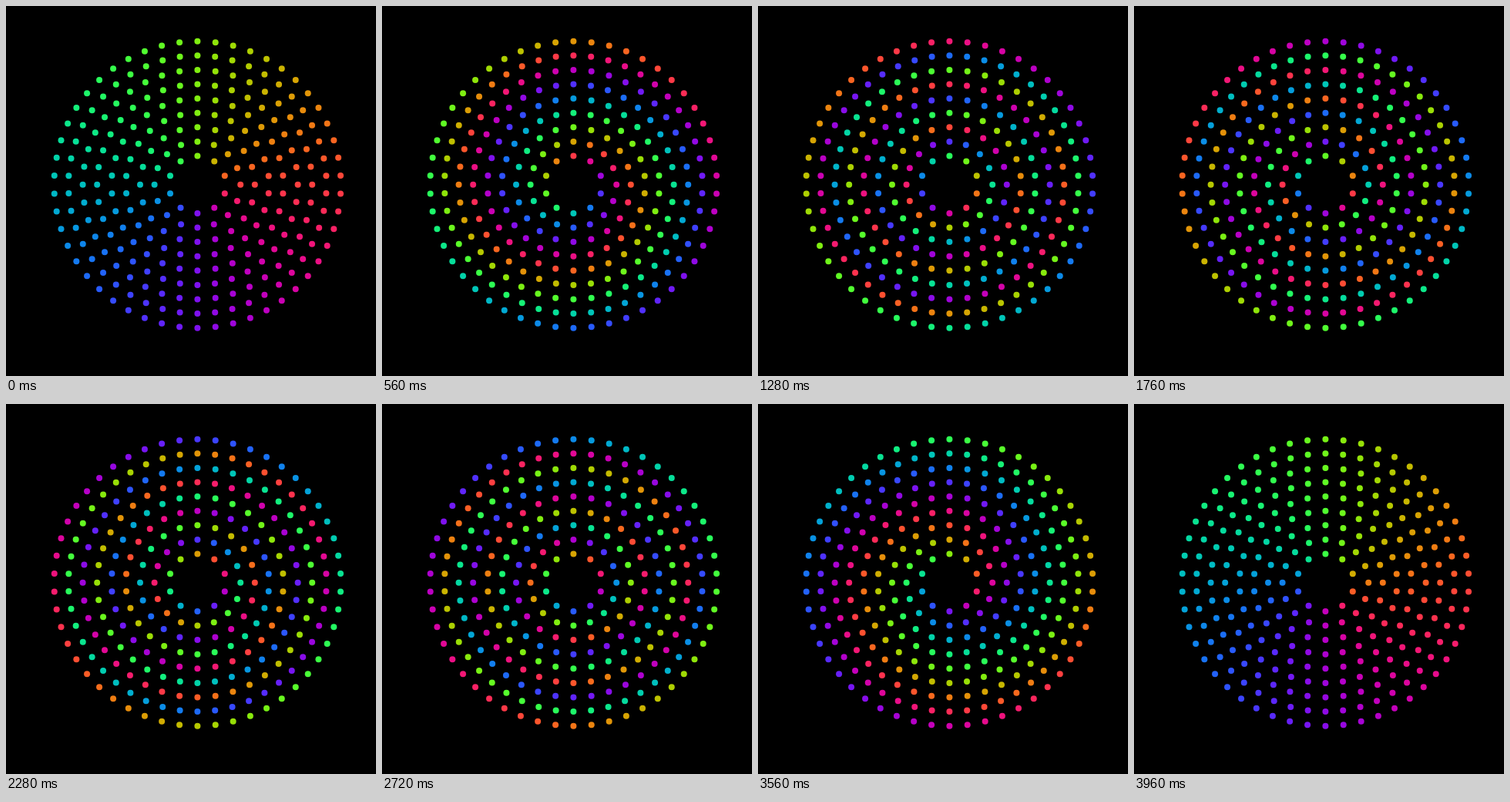
An HTML page with a canvas that plays this animation: 480x480 px, repeating every 4000 ms.

```html
<!DOCTYPE html>
<html lang="en">
<head>
<meta charset="utf-8">
<title>Rainbow rings</title>
<style>
  html, body { margin: 0; width: 100%; height: 100%; overflow: hidden; background: #000; }
  canvas { display: block; }
</style>
</head>
<body>
<canvas id="stage" width="480" height="480"></canvas>
<script>
const ctx = document.getElementById('stage').getContext('2d');
const TAU = 2 * Math.PI;
const LOOP = 4000, STEP = 40;
const CENTER = { x: 248.4, y: 231.7 };
const RING_GAP = 18.6, DOT_RADIUS = 4;
const OUTER = 10, INNER = 2;

// Each ring has an even dot count; inner rings cycle faster.
const dots = [];
for (let ring = INNER; ring <= OUTER; ring++) {
  const count = 2 * Math.round(2.5 * ring);
  for (let i = 0; i < count; i++) {
    const turn = 0.25 + i / count;
    dots.push({
      x: CENTER.x + RING_GAP * ring * Math.cos(turn * TAU),
      y: CENTER.y - RING_GAP * ring * Math.sin(turn * TAU),
      turn,
      speed: OUTER + 1 - ring
    });
  }
}

// Sine-squared rainbow, hue measured in turns.
function rainbow(hue) {
  const channel = shift => Math.round(255 * Math.sin(Math.PI * (hue + shift)) ** 2);
  return `rgb(${channel(1 / 2)}, ${channel(1 / 6)}, ${channel(5 / 6)})`;
}

function draw(time) {
  const progress = Math.floor((time % LOOP) / STEP + 0.001) * STEP / LOOP;
  ctx.fillStyle = '#000';
  ctx.fillRect(0, 0, 480, 480);
  for (const { x, y, turn, speed } of dots) {
    ctx.fillStyle = rainbow(turn - speed * progress);
    ctx.beginPath();
    ctx.arc(x, y, DOT_RADIUS, 0, TAU);
    ctx.fill();
  }
}

function tick() {
  draw(performance.now());
  requestAnimationFrame(tick);
}
tick();
</script>
</body>
</html>
```
